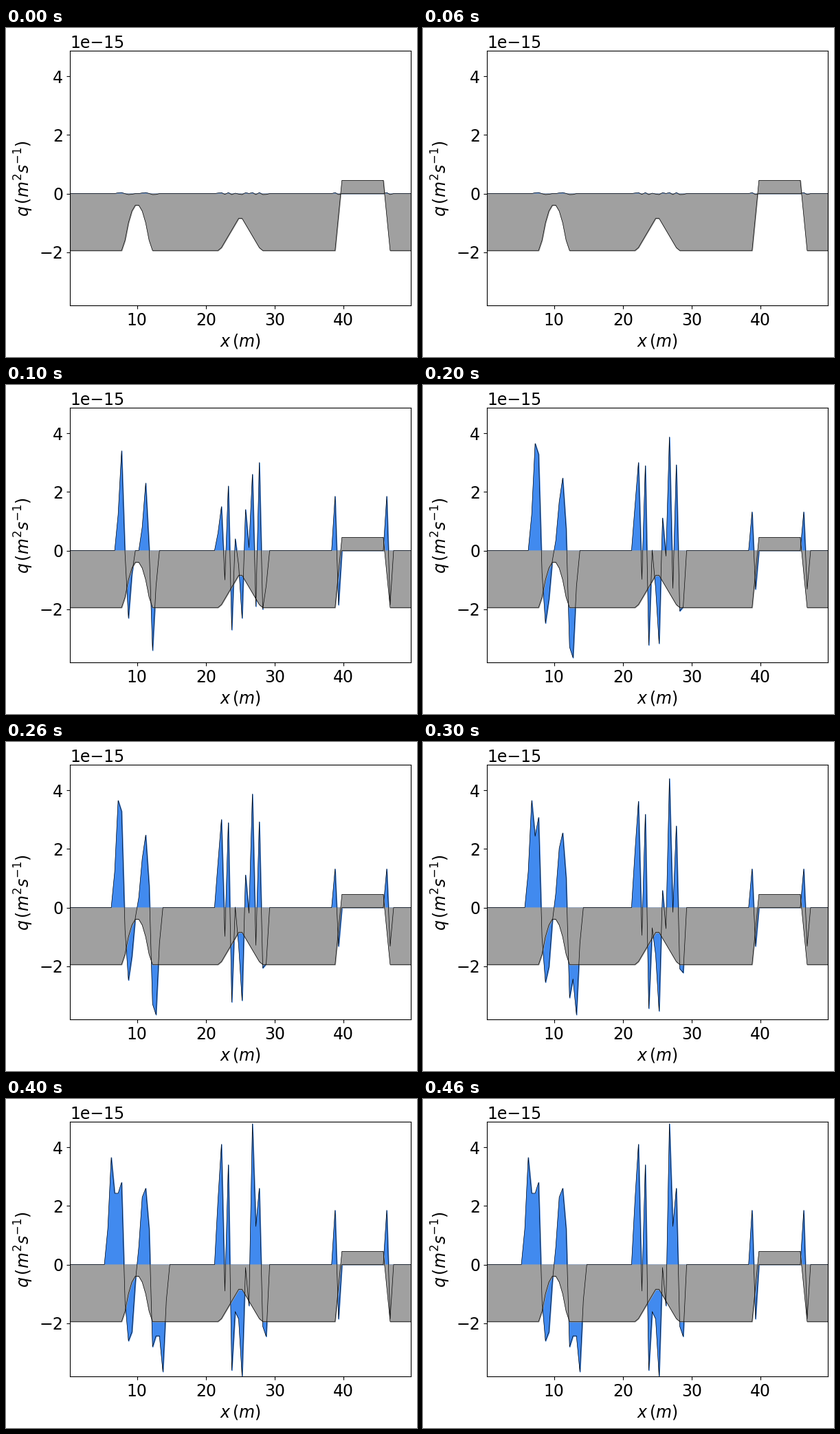
A matplotlib script that plays this animation: 598 px wide and 478 px high, repeating every 500 ms.

```python
import numpy as np
import matplotlib.pyplot as plt
from matplotlib.animation import FuncAnimation

W, H, DPI = 598, 478, 100
FRAMES = 5
UNIT = 1e-15
DX = 0.5
BLUE, GREY = "#418aef", "#a0a0a0"

plt.rcParams.update({"font.family": "DejaVu Sans", "font.size": 17,
                     "text.kerning_factor": 6})

nodes = np.arange(0, 50 + DX, DX)
x = (nodes[:-1] + nodes[1:]) / 2

# First and last pose of the discharge on each bump, one value per cell
SLOPE = ([3.4, -0.1, -2.3, -0.8, 0],
         [2.8, -1.23, -2.6, -2.3, -0.6])
RIDGE = ([0.6, 1.5, -1, 2.2, -2.7, 0.4, -0.5, -2.3, 1.4, 0.1, 2.6,
          -1.9, 3, -2, -1.2],
         [2.2, 4.1, -0.9, 3.4, -3.6, -1.6, -1.85, -3.8, -0.1, -1.4, 4.8,
          1.3, 2.6, -2.1, -2.45])


def bed_level():
    """Cell means of a parabola, a triangle and a block."""
    parabola = 0.2 - 0.05 * (nodes - 10) ** 2
    triangle = 0.15 - 0.05 * np.abs(nodes - 25)
    block = 0.3 * ((nodes > 39.2) & (nodes < 46.2))
    z = np.maximum.reduce([parabola, triangle, block, 0 * nodes])
    return (7.97 * (z[:-1] + z[1:]) / 2 - 1.94) * UNIT


def blend(poses, s):
    """Growing values ease out, shrinking or turning ones ease in."""
    first, last = map(np.array, poses)
    grows = (first * last >= 0) & (np.abs(last) > np.abs(first))
    return first + (last - first) * s ** np.where(grows, 0.5, 1.5)


def discharge(frame):
    k = max(frame - 1, 0)
    s = k / (FRAMES - 2)
    q = np.zeros_like(x)

    def put(start, values):
        i = int(start / DX)
        q[i:i + len(values)] = values

    # A wave runs off the parabola to the left, mirrored to the right
    front = 7.25 - DX * k
    wave = np.interp(np.arange(k + 1), [0, 1, 2], [1.22, 3.65, 2.43])
    left = np.concatenate([wave, blend(SLOPE, s)])
    put(front, left)
    put(10.25, -left[::-1])

    put(21.75, blend(RIDGE, s))

    spike = 1.25 + 0.6 * (2 * s - 1) ** 2
    for edge in (38.75, 46.25):
        put(edge, [spike, -spike])

    if frame == 0:
        q = 0.035 * np.tanh(q)
    return q * UNIT


fig = plt.figure(figsize=(W / DPI, H / DPI), dpi=DPI)
ax = fig.add_axes([93 / W, 75 / H, 496 / W, 369.6 / H])
ax.set_xlim(x[0], x[-1])
ax.set_ylim(-3.81 * UNIT, 4.86 * UNIT)
ax.set_xticks([10, 20, 30, 40])
ax.set_yticks(np.array([-2, 0, 2, 4]) * UNIT)
ax.set_xlabel(r"$x\,(m)$")
ax.set_ylabel(r"$q\,(m^2s^{-1})$", labelpad=5)

bed = bed_level()
water = ax.fill_between(x, 0 * x, discharge(0), color=BLUE, zorder=1)
ax.fill_between(x, bed, 0, color=GREY, zorder=1.5)
ax.plot(x, bed, color="black", lw=0.5)
surface, = ax.plot(x, discharge(0), color="black", lw=0.5)


def draw(frame):
    q = discharge(frame)
    outline = np.concatenate([np.column_stack([x, q]),
                              np.column_stack([x, 0 * x])[::-1]])
    water.set_verts([outline])
    surface.set_ydata(q)
    return water, surface


anim = FuncAnimation(fig, draw, frames=FRAMES, interval=100, repeat=True,
                     repeat_delay=0)
plt.show()
```
